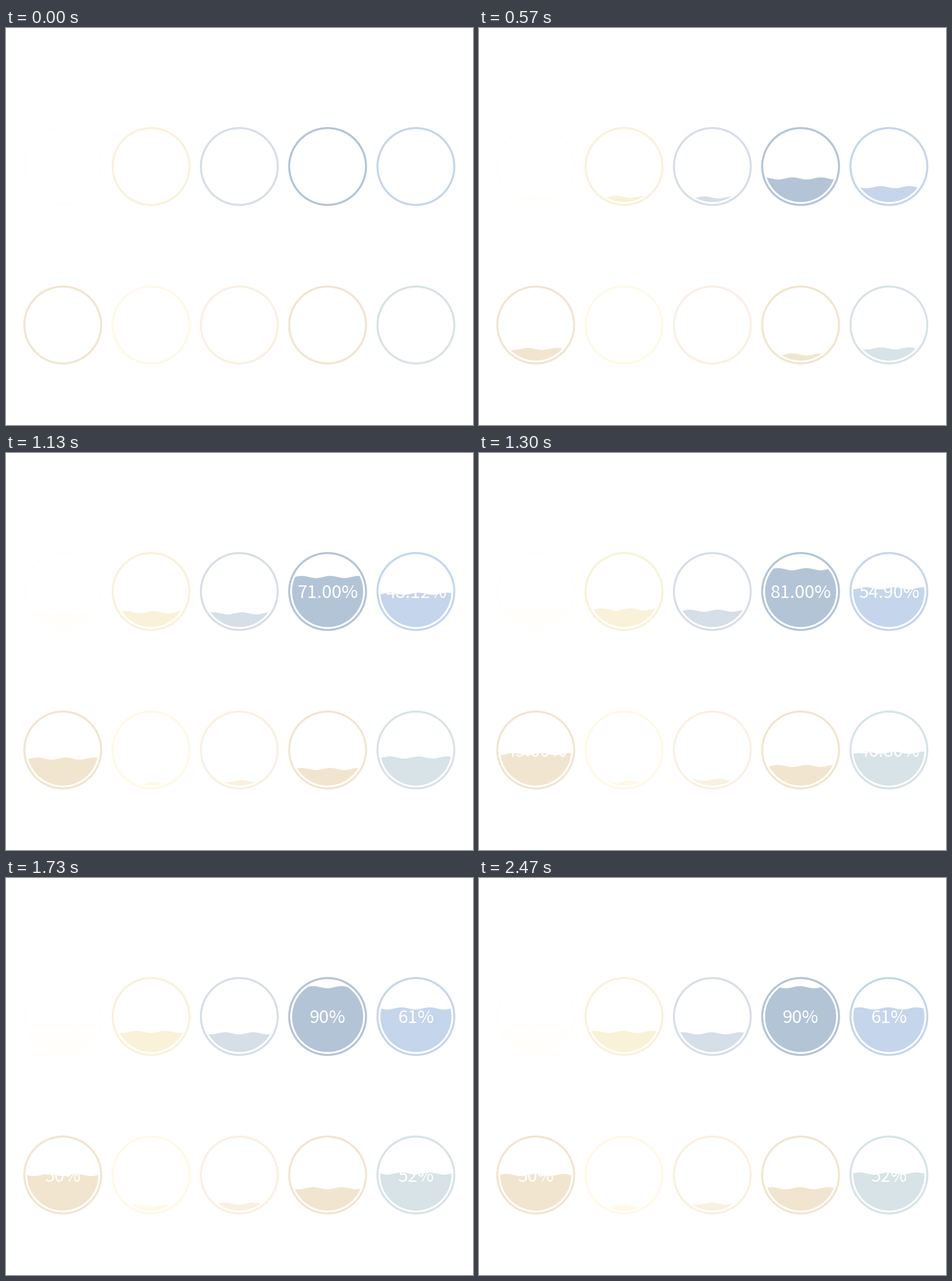
Animation, 812 px wide and 690 px high, one loop 2500 ms. Source, as a matplotlib script:

```python
import numpy as np
import matplotlib.pyplot as plt
from matplotlib.animation import FuncAnimation
from matplotlib.patches import Circle, Polygon

W, H, DPI = 812, 690, 64
PX = 72 / DPI                 # points per pixel
LOOP, INTERVAL = 2500, 20
STEP = 100 / 3                # the picture advances 30 times a second

RING_R, RING_W, FILL_R = 66.8, 3.5, 61.8
WAVE_AMP, WAVE_LEN, WAVE_SPEED = 1.85, 49.4, 1.09
RISE_STEPS = 45
START_DEPTH = 9               # the liquid starts this far below the bowl

GAUGES = [
    [(30, "#fffefa"), (29, "#f9f2d9"), (27, "#d6dee8"), (90, "#b3c4d7"), (61, "#c5d5eb")],
    [(50, "#f1e5cf"), (8, "#fff9e6"), (11, "#faf0e1"), (32, "#f1e5cf"), (52, "#d7e3e6")],
]
ROW_Y = [240.7, 516.2]

XS = FILL_R * np.sin(np.linspace(-np.pi / 2, np.pi / 2, 161))
BOWL = np.sqrt(np.maximum(FILL_R**2 - XS**2, 0))

fig = plt.figure(figsize=(W / DPI, H / DPI), dpi=DPI, facecolor="white")
ax = fig.add_axes([0, 0, 1, 1])
ax.set_xlim(0, W)
ax.set_ylim(H, 0)
ax.axis("off")


class Gauge:
    def __init__(self, x, y, value, color):
        self.x, self.y, self.value = x, y, value
        ax.add_patch(Circle((x, y), RING_R, fill=False, ec=color, lw=RING_W * PX))
        self.liquid = ax.add_patch(Polygon([(x, y)] * 3, fc=color, lw=0))
        self.label = ax.text(x + 0.3, y + 11.5, "", color="white", size=31 * PX,
                             family="Noto Sans CJK JP", ha="center", va="baseline")

    def update(self, step):
        rise = min(1, (step + 1.5) / RISE_STEPS)
        start = FILL_R + START_DEPTH
        end = FILL_R + WAVE_AMP - self.value / 100 * 2 * (FILL_R + WAVE_AMP)
        level = start + (end - start) * rise

        crest = WAVE_SPEED * (step - 17) - 14
        wave = level - WAVE_AMP * np.cos(2 * np.pi * (XS - crest) / WAVE_LEN)
        top = np.clip(wave, -BOWL, BOWL)
        outline = np.column_stack([np.r_[XS, XS[::-1]], np.r_[top, BOWL[::-1]]])
        self.liquid.set_xy(outline + (self.x, self.y))

        text = f"{self.value * rise:.2f}%" if rise < 1 else f"{self.value}%"
        self.label.set_text(text)


gauges = [
    Gauge(98.7 + 153.5 * col, y, value, color)
    for y, row in zip(ROW_Y, GAUGES)
    for col, (value, color) in enumerate(row)
]


def draw(i):
    step = int((i * INTERVAL + 14) / STEP)
    for gauge in gauges:
        gauge.update(step)
    return []


anim = FuncAnimation(fig, draw, frames=LOOP // INTERVAL, interval=INTERVAL,
                     init_func=lambda: draw(0), repeat=True, repeat_delay=0)
plt.show()
```
